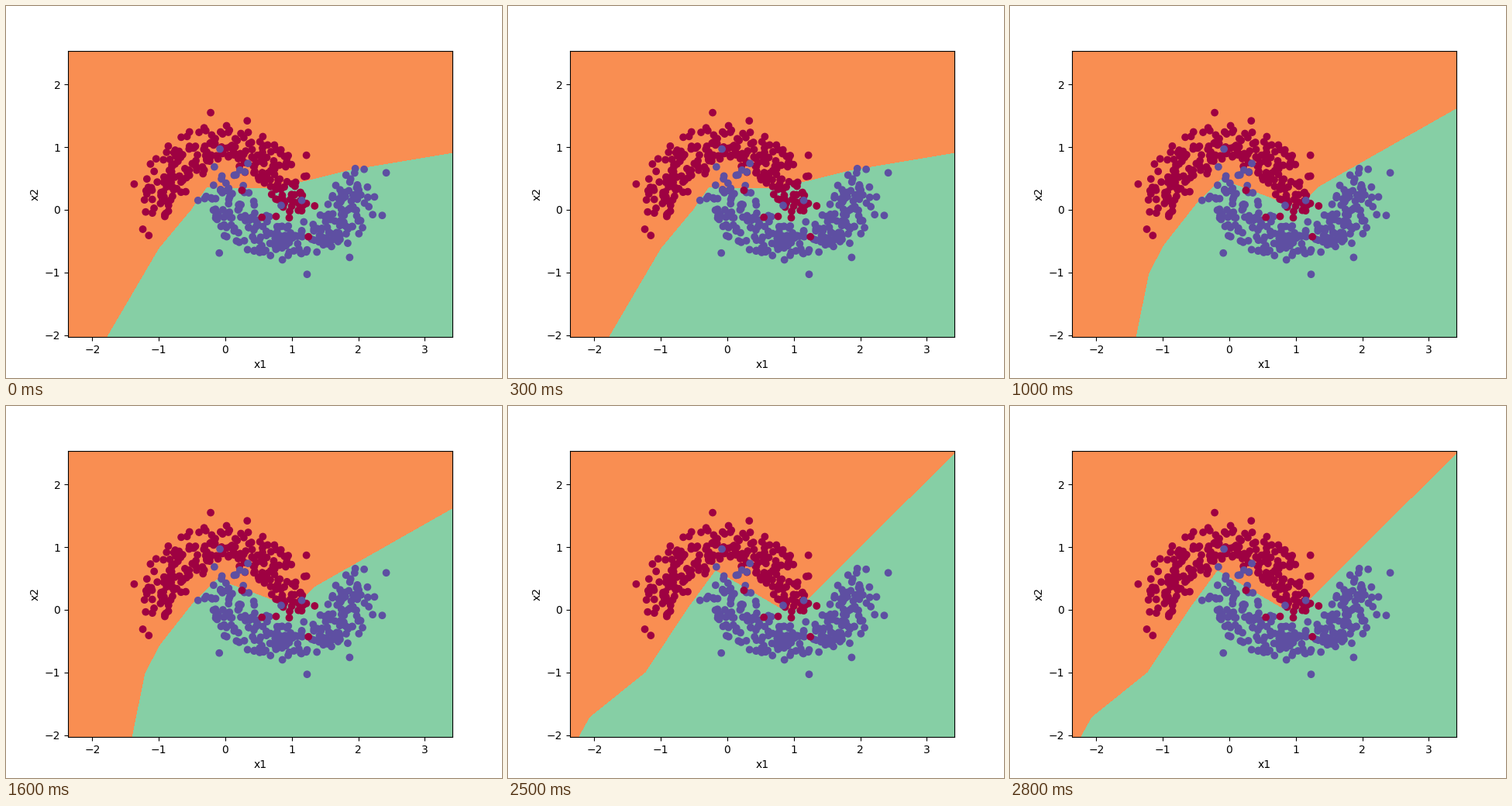
These frames come from a looping animation (640x480 px, 3000 ms). A matplotlib script:

```python
import numpy as np
import matplotlib.pyplot as plt
from matplotlib.animation import FuncAnimation

WIDTH, HEIGHT, DPI = 640, 480, 100
STEP_MS = 500
SCHEDULE = [0, 1, 2, 2, 3, 4]
SAMPLES = 240  # per class
SPREAD = 0.37

# Corners of the classifier boundary after each training stage, in stage pixels.
BOUNDARIES = [
    [(130.5, 428), (198, 313), (239, 264), (260, 234), (324, 236), (346, 235),
     (388, 226), (440, 213), (577, 190)],
    [(160, 428), (198, 321), (226, 281), (229, 270), (264, 235), (300, 228),
     (345, 244), (390, 233), (577, 165)],
    [(163, 428), (180, 345), (199, 309), (239, 258), (272, 224), (347, 252),
     (375, 257), (400, 233), (577, 132.5)],
    [(104, 428), (129, 381), (182, 337), (230, 264), (268, 215), (351, 262),
     (375, 262), (403, 232), (577, 78.5)],
    [(91.5, 428), (106, 402), (178, 344), (232, 262), (268, 213), (352, 262),
     (375, 262), (403, 234), (577, 61.5)],
]

# Samples that lie clearly outside the two bands, in data units.
RED_STRAYS = [(-1.37, 0.41), (-1.24, -0.31), (-1.15, -0.41), (-0.22, 1.55),
              (0.33, 1.42), (0.55, -0.12), (0.25, 0.31), (1.25, -0.43),
              (1.22, 0.87)]
BLUE_STRAYS = [(1.23, -1.03), (-0.09, -0.69), (-0.08, 0.97), (0.34, 0.74),
               (-0.41, 0.15), (0.84, 0.07), (1.15, 0.15), (2.42, 0.59),
               (2.36, -0.09), (1.87, -0.76)]


def band(curve, rng):
    """Samples along a half circle, each scattered within a small disc."""
    t = np.linspace(0, np.pi, SAMPLES)
    reach = SPREAD * rng.random_sample(SAMPLES) ** 0.6
    turn = rng.uniform(0, 2 * np.pi, SAMPLES)
    return curve(t) + (reach * [np.cos(turn), np.sin(turn)]).T


def make_cloud(seed=3):
    """Two interleaved moons with their strays, in a mixed drawing order."""
    rng = np.random.RandomState(seed)
    red = band(lambda t: np.column_stack([np.cos(t), np.sin(t)]), rng)
    blue = band(lambda t: np.column_stack([1 - np.cos(t), 0.5 - np.sin(t)]), rng)
    red = red[red[:, 1] > -0.15]
    blue = blue[blue[:, 1] < 0.72]
    points = np.vstack([red, blue])
    labels = np.repeat([0, 1], [len(red), len(blue)])
    order = rng.permutation(len(points))
    points = np.vstack([points[order], RED_STRAYS, BLUE_STRAYS])
    strays = np.repeat([0, 1], [len(RED_STRAYS), len(BLUE_STRAYS)])
    return points, np.append(labels[order], strays)


def to_data(pixels):
    x, y = np.transpose(pixels)
    return ax.transData.inverted().transform(np.column_stack([x, HEIGHT - y]))


fig, ax = plt.subplots(figsize=(WIDTH / DPI, HEIGHT / DPI), dpi=DPI)
ax.set(xlim=(-2.3651, 3.4151), ylim=(-2.0313, 2.5396), xlabel="x1", ylabel="x2")

spectral = plt.get_cmap("Spectral")
ax.set_facecolor(spectral(0.25))
regions = [to_data(line + [(577, 428)]) for line in BOUNDARIES]
region, = ax.fill(*regions[0].T, color=spectral(0.75), lw=0,
                  antialiased=False, zorder=0.5)

cloud, classes = make_cloud()
ax.scatter(*cloud.T, c=classes, cmap=spectral)


def update(i):
    region.set_xy(regions[SCHEDULE[i]])
    return region,


anim = FuncAnimation(fig, update, frames=len(SCHEDULE), interval=STEP_MS,
                     repeat=True, repeat_delay=0)
plt.show()
```
